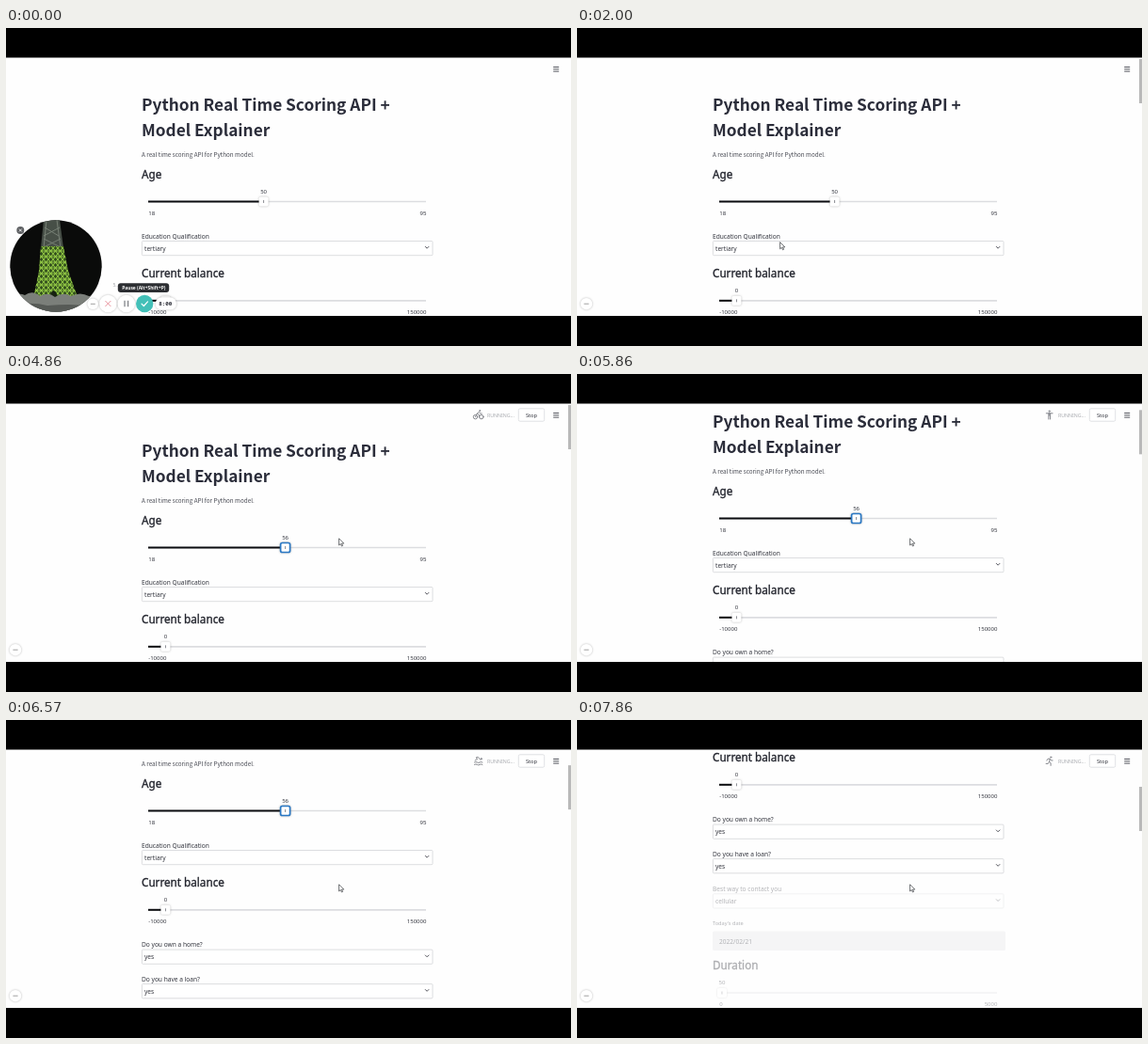
Write an HTML page that moves like this. It is 600 px wide and 338 px high and loops after 8 s.

```html
<!DOCTYPE html>
<html lang="en">
<head>
<meta charset="utf-8">
<title>Scoring demo</title>
<style>
html, body { margin: 0; width: 100%; height: 100%; overflow: hidden; background: #000; }
svg { display: block; width: 100%; height: 100%; }
text { font-family: "Noto Sans", "Open Sans", sans-serif; font-size: 6.6px; fill: #33353e; }
.title { font: 700 17.28px "Noto Sans CJK SC", "Noto Sans CJK JP", "Noto Sans", sans-serif; fill: #2b2d3a; }
.caption { font: 400 6.33px "Noto Sans CJK SC", "Noto Sans CJK JP", "Noto Sans", sans-serif; fill: #454750; }
.head { font-size: 11.7px; fill: #23252e; stroke: #23252e; stroke-width: .35px; }
.num { font-size: 6.05px; }
.mid { text-anchor: middle; }
.end { text-anchor: end; }
.line { fill: none; stroke-linecap: round; stroke-linejoin: round; }
.disc { fill: #fff; filter: drop-shadow(0 .4px 1px rgba(0, 0, 0, .28)); }
</style>
</head>
<body>
<svg id="stage" viewBox="0 0 600 338" xmlns="http://www.w3.org/2000/svg">
  <defs>
    <clipPath id="lens"><circle cx="53" cy="253" r="48.7"/></clipPath>
    <pattern id="lattice" width="5" height="6" patternUnits="userSpaceOnUse">
      <path d="M0 0l5 6M5 0l-5 6M0 3h5" stroke="#8fc443" stroke-width="1.1"/>
    </pattern>
  </defs>
  <rect y="31" width="600" height="275" fill="#fefefe"/>
  <g id="page"></g>

  <g id="status">
    <g id="sport" class="line" stroke="#85878d" stroke-width="1"></g>
    <text x="511" y="46.4" style="font-size:5.25px;fill:#a9abb0">RUNNING...</text>
    <rect x="544.3" y="36.8" width="27.4" height="13.4" rx="1.5" fill="#fff" stroke="#d9dade" stroke-width=".8"/>
    <text class="mid" x="558" y="45.8" style="font-size:5.7px">Stop</text>
  </g>
  <path d="M581.2 41.5h6M581.2 43.8h6M581.2 46.1h6" stroke="#55575f" stroke-width="1"/>
  <rect id="thumb" x="597" width="3" height="47" fill="#b9b9b9"/>

  <g id="recorder">
    <g clip-path="url(#lens)">
      <rect x="4" y="204" width="98" height="98" fill="#0a0b0a"/>
      <path id="mast" d="M40 204h17l4 30H37z" fill="#474f47"/>
      <path d="M43 204l-3 30M54 204l4 30M41 212l15 9M57 212l-17 9M40 224l18 9M58 224l-18 9" stroke="#7c857a" stroke-width=".9"/>
      <path d="M37 232h24l5 26 12 34H28l7-34z" fill="#2f4a1c"/>
      <path d="M37 232h24l5 26 12 34H28l7-34z" fill="url(#lattice)"/>
      <path d="M45 292q5-26 12 0z" fill="#172211"/>
      <path d="M4 302v-14q8-8 16-4 8-6 16 1 9-5 16 1 9-6 17-1 10-5 19 0 9-2 14 6v11z" fill="#7b7f7a"/>
      <path d="M4 302v-6q20-6 40-1 30-3 58 2v5z" fill="#565a56"/>
    </g>
    <circle cx="15.3" cy="215" r="4" fill="#5d5f62"/>
    <path d="M13.8 213.5l3 3m0-3l-3 3" stroke="#fff" stroke-width=".8"/>
    <text x="113.5" y="274.5" style="font-size:5px;fill:#a2a4a8">5.</text>
    <rect x="118.8" y="271.3" width="54.4" height="9.6" rx="3" fill="#2c2e32"/>
    <text class="mid" x="146.3" y="278" style="font-size:4.9px;font-weight:600;fill:#fff">Pause (Alt+Shift+P)</text>
    <circle class="disc" cx="92.3" cy="293.3" r="5.8"/>
    <path d="M89.8 293.3h5" stroke="#888" stroke-width=".8"/>
    <circle class="disc" cx="108.4" cy="293" r="9.3"/>
    <path class="line" d="M105.7 290.3l5.4 5.4m0-5.4l-5.4 5.4" stroke="#e68792" stroke-width=".9"/>
    <circle class="disc" cx="127.8" cy="293" r="9.3"/>
    <path d="M126 289.8v6.4M129.6 289.8v6.4" stroke="#7a7d82" stroke-width="1.2"/>
    <circle cx="147.2" cy="293" r="9.2" fill="#43c0b8"/>
    <path class="line" d="M144 293.2l2.3 2.3 4.2-4.6" stroke="#fff" stroke-width="1.2"/>
    <rect class="disc" x="158.6" y="286.2" width="22.4" height="13.4" rx="6.7"/>
    <text class="mid" x="169.2" y="295.2" style="font:600 5.9px 'Noto Sans Mono',monospace">8:00</text>
  </g>
  <g id="dock">
    <circle class="disc" cx="10" cy="293.2" r="6.2"/>
    <path d="M7.4 293.2h5.2" stroke="#888" stroke-width=".8"/>
  </g>

  <g id="cursor">
    <path id="arrow" d="M0 0v7.2l1.7-1.5 1.2 2.5 1.1-.5-1.1-2.4h2.3z" fill="#fff" stroke="#33353a" stroke-width=".7"/>
    <g id="grab" class="line" stroke="#3b3d42" stroke-width=".8">
      <path d="M-2.3 1.7q-.9-2.2.2-3.6 1.4-1.2 2.5-.7l2.1.1-.1 3-1.2 1.8q-1.8.9-3.5-.6z" fill="#fff"/>
    </g>
  </g>
  <path d="M0 0h600v31.6H0zM0 306h600v32H0z"/>
</svg>
<script>
const LOOP = 8000, STEPS = 56;
const LEFT = 151, RIGHT = 446;
const $ = id => document.getElementById(id);

const text = (x, y, str, cls = "", id = "") =>
  `<text x="${x}" y="${y}" class="${cls}"${id && ` id="${id}"`}>${str}</text>`;

const select = (y, label, value) =>
  text(144, y, label) +
  `<rect x="144.4" y="${y + 2.8}" width="308.6" height="15.2" rx="1" fill="#fff" stroke="#d4d5d8" stroke-width=".8"/>` +
  text(147, y + 13.1, value) +
  `<path class="line" d="M445.3 ${y + 8.7}l1.8 1.8 1.8-1.8" stroke="#44464e" stroke-width=".9"/>`;

function slider(id, y, value, min, max) {
  const x = LEFT + (value - min) / (max - min) * (RIGHT - LEFT);
  return `<path d="M${LEFT} ${y}H${RIGHT}" stroke="#dcdde0" stroke-width="1.7"/>
    <rect id="${id}Fill" x="${LEFT}" y="${y - 1}" width="${x - LEFT}" height="2" fill="#0c0d10"/>
    <g id="${id}Knob" transform="translate(${x} ${y})">
      <rect class="disc" x="-5" y="-5" width="10" height="10" rx="1.8"/>
      <path d="M0-1.5v3" stroke="#6d6f76" stroke-width=".8"/>
      ${text(0, -8.7, value, "num mid", id + "Value")}
    </g>` +
    text(LEFT + .2, y + 14.3, min, "num") + text(RIGHT + .5, y + 14.3, max, "num end");
}

$("page").innerHTML =
  text(144, 88, "Python Real Time Scoring API +", "title") +
  text(144, 115.3, "Model Explainer", "title") +
  text(144, 136.7, "A real time scoring API for Python model.", "caption") +
  text(144, 159.8, "Age", "head") +
  slider("age", 184.5, 50, 18, 95) +
  select(223.7, "Education Qualification", "tertiary") +
  text(144, 265, "Current balance", "head") +
  slider("balance", 289.8, 0, -10000, 150000) +
  select(329.3, "Do you own a home?", "yes") +
  select(365.8, "Do you have a loan?", "yes") +
  `<g opacity=".36">` +
  select(403, "Best way to contact you", "cellular") +
  `<text x="144" y="439" style="font-size:5.6px">Today's date</text>
   <rect x="144" y="445.5" width="311" height="20.5" rx="1.5" fill="#e6e7ea"/>` +
  text(151, 458.5, "2022/02/21") +
  text(144, 486.3, "Duration", "head") +
  slider("duration", 511, 50, 0, 5000) +
  `</g>`;

const ring = $("ageKnob").querySelector("rect");

// Small activity figures, drawn around their own centre
const bike = `<circle cx="-3.2" cy="2" r="2.2"/><circle cx="3.2" cy="2" r="2.2"/>
  <path d="M-3.2 2l1.6-3.4 2.4 1.4v2.4M-1.6-1.4l2.2-1.8 1.4 1.6h1.6"/><circle cx="1.4" cy="-4.6" r=".5"/>`;
const runner = `<circle cx="1.5" cy="-4" r=".6"/>
  <path d="M-2.8-.6l1.2-1.8h2.2l-.8 3.2 1.6 1.2v2.8M-.2.8l-1.2 2h-2.2M.6-2.2l1.2 1.6h1.6"/>`;
const person = `<circle cy="-4" r=".7"/><path d="M-3.4-1.8h6.8M0-1.8v2.4M-.9-1.6v6M.9-1.6v6"/>`;
const swimmer = `<path d="M-4.2 1.4q1.4-1 2.8 0t2.8 0 2.8 0M-4.2 3.8q1.4-1 2.8 0t2.8 0 2.8 0M-3.6-.6l2.6-1.6-1.6-1.4 2.2-.6 2.6 3"/><circle cx="3" cy="-2.4" r=".6"/>`;
const sports = [bike, runner, person, swimmer, runner];

// Linear interpolation through [step, value] pairs
function along(points, k) {
  if (k <= points[0][0]) return points[0][1];
  for (let i = 1; i < points.length; i++) {
    const [a, u] = points[i - 1], [b, v] = points[i];
    if (k <= b) return u + (v - u) * (k - a) / (b - a);
  }
  return points[points.length - 1][1];
}

const knobX = [[18, 273.6], [20, 285.2], [25, 285.2], [28, 296.6]];
const scroll = [[38, 0], [41, 31], [46, 88], [55, 221]];
const mouseX = [[11, 128], [16, 274], [18, 274], [20, 287], [23, 289], [27, 300], [31, 353.6]];
const mouseY = [[11, 290], [16, 186], [18, 184], [23, 157], [27, 172], [31, 174.8]];

const show = (id, on) => $(id).style.display = on ? "" : "none";

function draw(ms) {
  const k = Math.floor((ms % LOOP + 4) * STEPS / LOOP) % STEPS;
  const top = along(scroll, k);
  const x = along(knobX, k);
  const focused = k >= 18;

  $("page").setAttribute("transform", `translate(0 ${-top})`);
  $("thumb").setAttribute("y", 33 + top * .172);
  $("ageFill").setAttribute("width", x - LEFT);
  $("ageKnob").setAttribute("transform", `translate(${x} 184.5)`);
  $("ageValue").textContent = k < 18 ? 50 : k < 25 ? 51 : 56;
  ring.setAttribute("stroke", focused ? "#2a78c4" : "none");
  ring.setAttribute("stroke-width", 1.7);

  show("thumb", k >= 7);
  show("recorder", k < 11);
  show("dock", k >= 11);
  show("status", k >= 31);
  const sport = sports[Math.min(4, Math.max(0, Math.floor((k - 31) / 5)))];
  if ($("sport").shape !== sport) {
    $("sport").shape = sport;
    $("sport").innerHTML = sport;
  }
  $("sport").setAttribute("transform", "translate(501.7 43.6)");

  const grabbing = k >= 16 && k < 27;
  show("cursor", k >= 11);
  show("arrow", !grabbing);
  show("grab", grabbing);
  $("cursor").setAttribute("transform", `translate(${along(mouseX, k)} ${along(mouseY, k)})`);
}

const start = performance.now();
function tick() {
  draw(performance.now() - start);
  requestAnimationFrame(tick);
}
tick();
</script>
</body>
</html>
```
